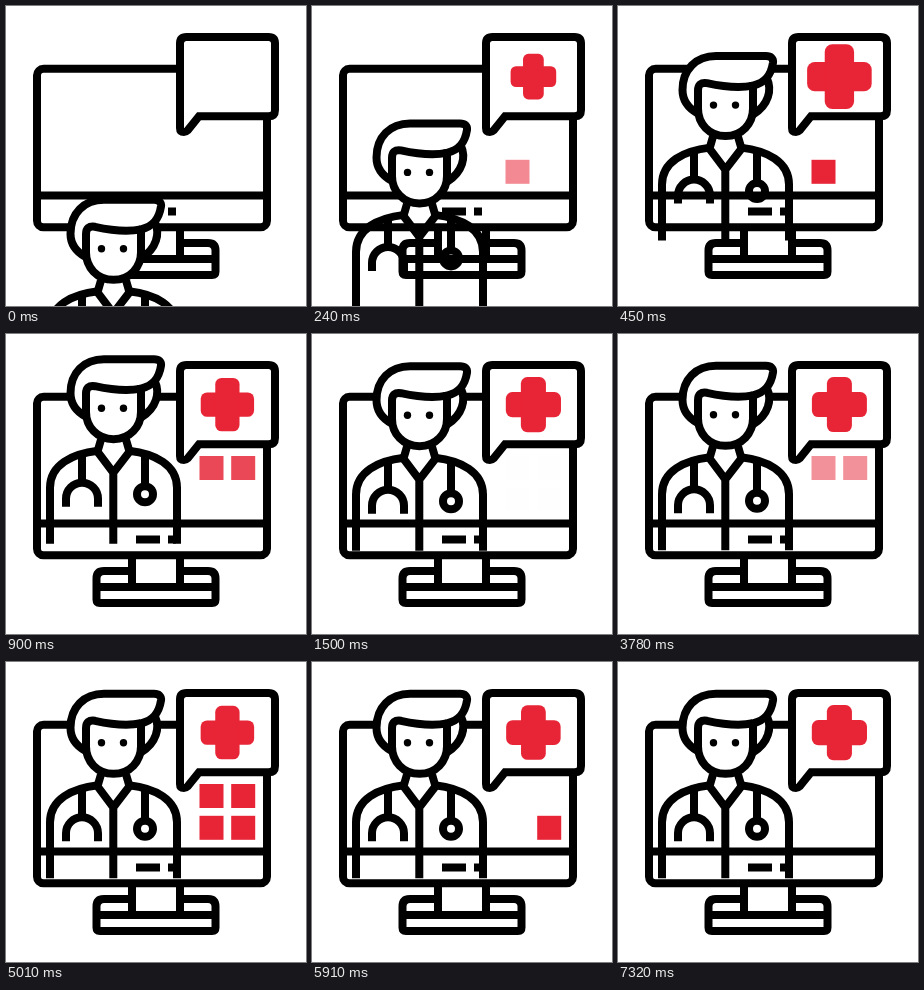
Recreate the animation shown at these times as an HTML page. Size 300 by 300 pixels, loop 7.35 s.

```html
<!DOCTYPE html>
<html lang="en">
<head>
<meta charset="utf-8">
<title>Online doctor</title>
<style>
  html, body { margin: 0; width: 100%; height: 100%; overflow: hidden; background: #fff; }
  svg { display: block; width: 100vw; height: 100vh; }
  .ink { fill: none; stroke: #000; stroke-width: 8; }
  .paper { fill: #fff; }
  .red { fill: #e82536; }
</style>
</head>
<body>
<svg viewBox="0 0 300 300">
  <g class="ink">
    <rect x="31" y="62.800" width="230" height="158.500" rx="6.500"/>
    <path d="M31 189.500H261M130 205.500H154M162 205.500H170"/>
    <path d="M126 221V253M174 221V253M126 237H98Q90.500 237 90.500 244.500V265.500Q90.500 269 94 269H206Q209.500 269 209.500 265.500V244.500Q209.500 237 202 237H174M90.500 253H209.500"/>
  </g>
  <g class="red" id="tiles">
    <rect x="193.500" y="122" width="24" height="24"/>
    <rect x="225.200" y="122" width="24" height="24"/>
    <rect x="193.500" y="153.800" width="24" height="24"/>
    <rect x="225.200" y="153.800" width="24" height="24"/>
  </g>
  <g id="doctor" class="ink">
    <g transform="translate(0 -0.7)">
      <path d="M95 113L91.500 125L107.300 146L123.500 125L120 113M107.300 146V217"/>
      <path d="M92 124C66 127 44 138 44 161V217M123 124C149 127 171 138 171 161V217"/>
      <path d="M76 129V156M60 180V172A16 16 0 0 1 92 172V180M139 129V159"/>
      <circle cx="139" cy="167.500" r="8"/>
      <path class="paper" d="M135 60L149 55C154 66 151 81 135 91Z"/>
      <path class="paper" d="M80 90C69 84 64.500 76 64.500 66.500C64.500 46 78 32.500 98 32.500H148C153 32.500 155.500 35 155 39C153 52 147 59 135 62V85C135 100 124 112.500 107.500 112.500C91 112.500 80 100 80 85Z"/>
      <path d="M80 90V67Q80 58 89 59.500C105 63 120 65 135 62"/>
      <g fill="#000" stroke="none">
        <circle cx="95.500" cy="81.500" r="3.700"/>
        <circle cx="117.500" cy="81.500" r="3.700"/>
      </g>
    </g>
  </g>
  <path class="ink paper" d="M193 110.300H262.500Q269 110.300 269 104V37.500Q269 31 262.500 31H180.500Q174 31 174 37.500V122Q174 126 178 126Q180 126 181.500 124.500Z"/>
  <g class="red" id="cross">
    <rect x="-27.500" y="-12.500" width="55" height="25" rx="6.500"/>
    <rect x="-12.500" y="-27.500" width="25" height="55" rx="6.500"/>
  </g>
</svg>
<script>
  const LOOP = 7350, BLINK = 3000;
  const doctor = document.getElementById('doctor');
  const cross = document.getElementById('cross');
  const tiles = [...document.getElementById('tiles').children];
  const clamp = v => Math.max(0, Math.min(1, v));

  // Remaining distance (1 to 0) of a damped spring after s seconds.
  const spring = (s, w, k) =>
    Math.exp(-k * s) * (Math.cos(w * s) + k / w * Math.sin(w * s));

  // Fade in from a to b, hold, fade out from c to d.
  const pulse = (p, a, b, c, d) => Math.min(clamp((p - a) / (b - a)), clamp((d - p) / (d - c)));

  function crossScale(t) {
    const s = (t - 4500) / 1000;
    const kick = s > 0 ? 0.12 * Math.exp(-1.2 * s) * Math.sin(7 * s) : 0;
    return 1 - spring(t / 1000, 7, 3.9) + kick;
  }

  function draw(t) {
    doctor.setAttribute('transform', `translate(0 ${162 * spring(t / 1000, 4.08, 3.88)})`);
    cross.setAttribute('transform', `translate(221.4 70.6) scale(${crossScale(t)})`);
    const p = t % BLINK;
    const all = pulse(p, 1500, 1950, 2040, 2400);
    const top = pulse(p, 600, 960, 960, 1260);
    const left = pulse(p, 60, 400, 460, 750);
    const right = pulse(p, 2400, 2750, 2920, 3000);
    [top, top, left, right].forEach((v, i) => tiles[i].setAttribute('opacity', Math.max(all, v)));
  }

  const start = performance.now();
  function tick() {
    draw((performance.now() - start) % LOOP);
    requestAnimationFrame(tick);
  }
  tick();
</script>
</body>
</html>
```
